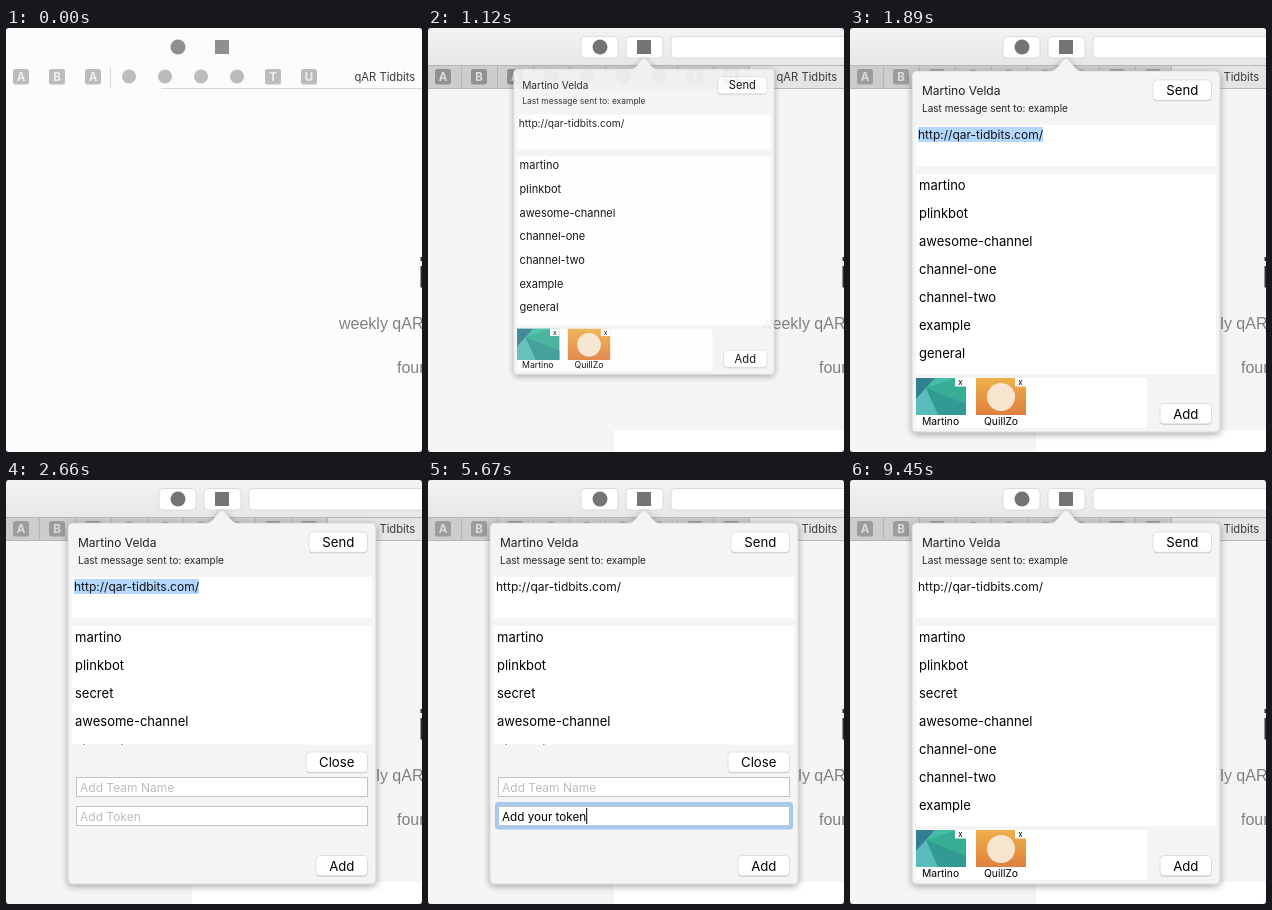
An HTML page that plays this animation: 416 px wide and 424 px high, repeating every 9520 ms.

```html
<!DOCTYPE html>
<html lang="en">
<head>
<meta charset="utf-8">
<title>Share popover</title>
<style>
html, body { margin: 0; width: 100%; height: 100%; overflow: hidden; background: #fcfcfc; }
svg { display: block; width: 416px; height: 424px; font-family: Inter, "Open Sans", sans-serif; }
text { white-space: pre; }
.page { font: 16px "Liberation Sans", Arial, sans-serif; fill: #808080; }
.hint { fill: #bcbcbc; font-size: 12px; }
</style>
</head>
<body>
<svg id="stage" viewBox="0 0 416 424">
  <defs>
    <linearGradient id="bar" x2="0" y2="1">
      <stop stop-color="#f3f3f3"/><stop offset="1" stop-color="#e7e7e7"/>
    </linearGradient>
    <linearGradient id="amber" x2="0" y2="1">
      <stop stop-color="#eeb04b"/><stop offset="1" stop-color="#e07f3d"/>
    </linearGradient>
    <filter id="shadow" x="-10%" y="-10%" width="120%" height="120%">
      <feDropShadow dx="0" dy="2" stdDeviation="3.5" flood-opacity=".36"/>
    </filter>
    <clipPath id="listClip"><rect id="listClipBox" x="66" y="146" width="300"/></clipPath>
  </defs>

  <rect width="416" height="424" fill="#fcfcfc"/>
  <path d="M155 60.5H416M104.5 40V60" stroke="#d8d8d8"/>
  <g id="chrome">
    <rect y="61" width="416" height="363" fill="#f5f5f5"/>
    <rect x="186" y="402" width="230" height="22" fill="#fff"/>
    <rect width="416" height="38" fill="url(#bar)"/>
    <rect y="37" width="416" height="24" fill="#cdcdcd"/>
    <rect x="321" y="38" width="95" height="23" fill="#e4e4e4"/>
    <path id="dividers" stroke="#b5b5b5"/>
    <path d="M0 37.5H416M0 60.5H416" stroke="#b8b8b8"/>
    <g fill="#fff" stroke="#d4d4d4" stroke-width=".8">
      <rect x="153" y="8.5" width="37" height="21.5" rx="4"/>
      <rect x="198" y="8.5" width="37" height="21.5" rx="4"/>
      <rect x="243" y="8.5" width="190" height="21.5" rx="4"/>
    </g>
  </g>
  <g id="tools" fill="#747474">
    <circle cx="172" cy="19" r="7.5"/>
    <rect x="209" y="12" width="14" height="14"/>
  </g>
  <g id="tabs"></g>
  <text x="348.5" y="53" font-size="11.2" fill="#3a3a3a">qAR Tidbits</text>
  <path d="M414.5 229H416V233H414.5ZM414.5 238H416V259.5H414.5Z" fill="#333"/>
  <text class="page" x="333" y="301">weekly qAR</text>
  <text class="page" x="391" y="345">founded</text>

  <g id="popover">
    <path d="M67 43H201C208 43 211 30.5 216 30.5S224 43 231 43H365Q370 43 370 48V399Q370 404 365 404H67Q62 404 62 399V48Q62 43 67 43Z"
      fill="#f4f4f4" stroke="#c6c6c6" stroke-width=".6" filter="url(#shadow)"/>
    <text x="72" y="67" font-size="12" fill="#222">Martino Velda</text>
    <text x="72" y="84" font-size="10" fill="#222">Last message sent to: example</text>
    <rect x="66" y="97" width="300" height="41" fill="#fff"/>
    <rect id="selection" x="68" y="99" height="15" fill="#b3d7fd"/>
    <text id="address" x="68" y="111" font-size="12" fill="#111">http://qar-tidbits.com/</text>
    <rect id="list" x="66" y="146" width="300" fill="#fff"/>
    <g id="rows" font-size="13" clip-path="url(#listClip)"></g>

    <g id="teams">
      <rect x="66" y="350" width="231" height="50" fill="#fff"/>
      <g id="thumbs">
        <rect x="66" y="350" width="50" height="37" fill="#38ad96"/>
        <path d="M66 350H85L66 371Z" fill="#327f91"/>
        <path d="M85 350H106L76 360Z" fill="#45bda4"/>
        <path d="M66 371L76 360L116 376V387H66Z" fill="#319a92"/>
        <path d="M66 371L76 360L88 387H66Z" fill="#58bdb9"/>
        <rect x="126" y="350" width="50" height="37" fill="url(#amber)"/>
        <circle cx="151" cy="369" r="14" fill="#f7e5d0"/>
        <path d="M105 350h11v8.5h-11ZM165 350h11v8.5h-11Z" fill="#fff"/>
        <g font-size="8" text-anchor="middle"><text x="110.5" y="357">x</text><text x="170.5" y="357">x</text></g>
      </g>
      <g font-size="10.3" text-anchor="middle"><text x="90.5" y="397">Martino</text><text x="151" y="397">QuillZo</text></g>
    </g>

    <g id="form">
      <g fill="#fff" stroke="#c4c4c4">
        <rect x="70.5" y="297.5" width="291" height="19"/>
        <rect x="70.5" y="326.5" width="291" height="19"/>
      </g>
      <text class="hint" x="74" y="312">Add Team Name</text>
      <text id="tokenHint" class="hint" x="74" y="341">Add Token</text>
      <rect id="ring" x="69" y="324" width="294" height="23.5" rx="1.5" fill="none" stroke="#a9c9ec" stroke-width="4"/>
      <text id="token" x="74" y="341" font-size="11.7"></text>
      <rect id="caret" y="328" width="1" height="16"/>
    </g>
    <g id="buttons" font-size="13.2" text-anchor="middle"></g>
  </g>
  <path d="M0 0H3Q0 0 0 3ZM416 0V3Q416 0 413 0ZM0 424V421Q0 424 3 424ZM416 424H413Q416 424 416 421Z" fill="#333"/>
</svg>
<script>
const LOOP = 9520, STEP = 70;
const NS = 'http://www.w3.org/2000/svg';
const $ = id => document.getElementById(id);
const set = (el, attrs) => { for (const k in attrs) el.setAttribute(k, attrs[k]); };
const add = (parent, tag, attrs, text = '') => {
  const el = document.createElementNS(NS, tag);
  set(el, attrs);
  el.textContent = text;
  return parent.appendChild(el);
};
const ramp = (t, a, b) => Math.min(1, Math.max(0, (t - a) / (b - a)));
const ease = p => p * p * (3 - 2 * p);
const fade = (id, v) => $(id).setAttribute('opacity', v);
const show = (id, on) => $(id).setAttribute('visibility', on ? 'inherit' : 'hidden');

// Pinned tabs: a lettered tile, or a plain dot where there is no letter
[...'ABA    TU'].forEach((c, i) => {
  const x = 15 + 36 * i;
  if (c === ' ') {
    add($('tabs'), 'circle', { cx: x, cy: 48.5, r: 7, fill: '#7d7d7d' });
  } else {
    add($('tabs'), 'rect', { x: x - 8, y: 41, width: 16, height: 15.5, rx: 2.5, fill: '#7d7d7d' });
    add($('tabs'), 'text', { x, y: 53, 'font-size': 11.5, 'font-weight': 700, 'text-anchor': 'middle', fill: '#e4e4e4' }, c);
  }
});
$('dividers').setAttribute('d', Array.from({ length: 9 }, (_, i) => `M${33.5 + 36 * i} 38V60`).join(''));

const names = ['martino', 'plinkbot', 'secret', 'awesome-channel', 'channel-one', 'channel-two', 'example', 'general'];
const rows = names.map(name => add($('rows'), 'text', { x: 69 }, name));

const button = (x, y, width, label) => {
  const g = add($('buttons'), 'g', {});
  add(g, 'rect', { x, y: y + .7, width, height: 20.5, rx: 4, fill: '#c4c4c4' });
  add(g, 'rect', { x, y, width, height: 20.3, rx: 4, fill: '#fff', stroke: '#d6d6d6', 'stroke-width': .7 });
  add(g, 'text', { x: x + width / 2, y: y + 15 }, label);
  return g;
};
button(303, 52, 58.5, 'Send');
button(310, 375.5, 51.5, 'Add');
const closeButton = button(300, 272, 61.5, 'Close');

const phrase = 'Add your token here!';
// Each burst of typing: first key, last key, length before, length after
const bursts = [[3990, 3990, 0, 1], [4200, 5180, 1, 9], [5320, 5670, 9, 14], [5810, 6370, 14, 19], [6860, 6860, 19, 20]];
const typed = t => {
  let n = 0;
  for (const [a, b, from, to] of bursts) {
    if (t < a) break;
    n = b === a ? to : from + 1 + Math.floor((to - from - 1) * ramp(t, a, b) + 1e-6);
  }
  return n;
};

function draw(t) {
  const open = ease(ramp(t, 2310, 2590)) * (1 - ease(ramp(t, 8610, 9030)));
  const pop = ramp(t, 840, 1190);
  const scale = .23 + .77 * pop;

  fade('chrome', ramp(t, 490, 910));
  fade('tools', .8 + .2 * ramp(t, 0, 280));
  fade('tabs', .5 + .15 * ramp(t, 0, 280) + .25 * ramp(t, 490, 910) - .3 * ramp(t, 980, 1260));
  fade('popover', pop && Math.min(1, .1 + pop));
  $('popover').setAttribute('transform', `translate(216 30) scale(${scale}) translate(-216 -30)`);

  show('selection', t >= 1610 && t < 3150);
  $('selection').setAttribute('width', $('address').getComputedTextLength());
  const height = 200 - 81.5 * open;
  $('list').setAttribute('height', height);
  $('listClipBox').setAttribute('height', height);
  const secret = t >= 2310;
  rows.forEach((row, i) => {
    const slot = secret || i < 2 ? i : i - 1;
    set(row, { y: 161.5 + 28 * slot, visibility: secret || i !== 2 ? 'inherit' : 'hidden' });
  });

  fade('teams', 1 - open);
  fade('thumbs', t < 5000 ? 1 : ramp(t, 9240, 9450));
  fade('form', open);
  closeButton.setAttribute('opacity', open);

  const n = typed(t);
  const focus = t >= 3150 && t < 8610;
  $('token').textContent = phrase.slice(0, n);
  show('tokenHint', !n);
  fade('ring', focus ? ramp(t, 3080, 3360) : 0);
  show('caret', focus && !(t >= 7420 && t < 7980));
  $('caret').setAttribute('x', 74 + (n ? $('token').getComputedTextLength() : 0));
}

function tick() {
  const t = performance.now() % LOOP;
  draw(Math.floor(t / STEP) * STEP);
  requestAnimationFrame(tick);
}
tick();
</script>
</body>
</html>
```
